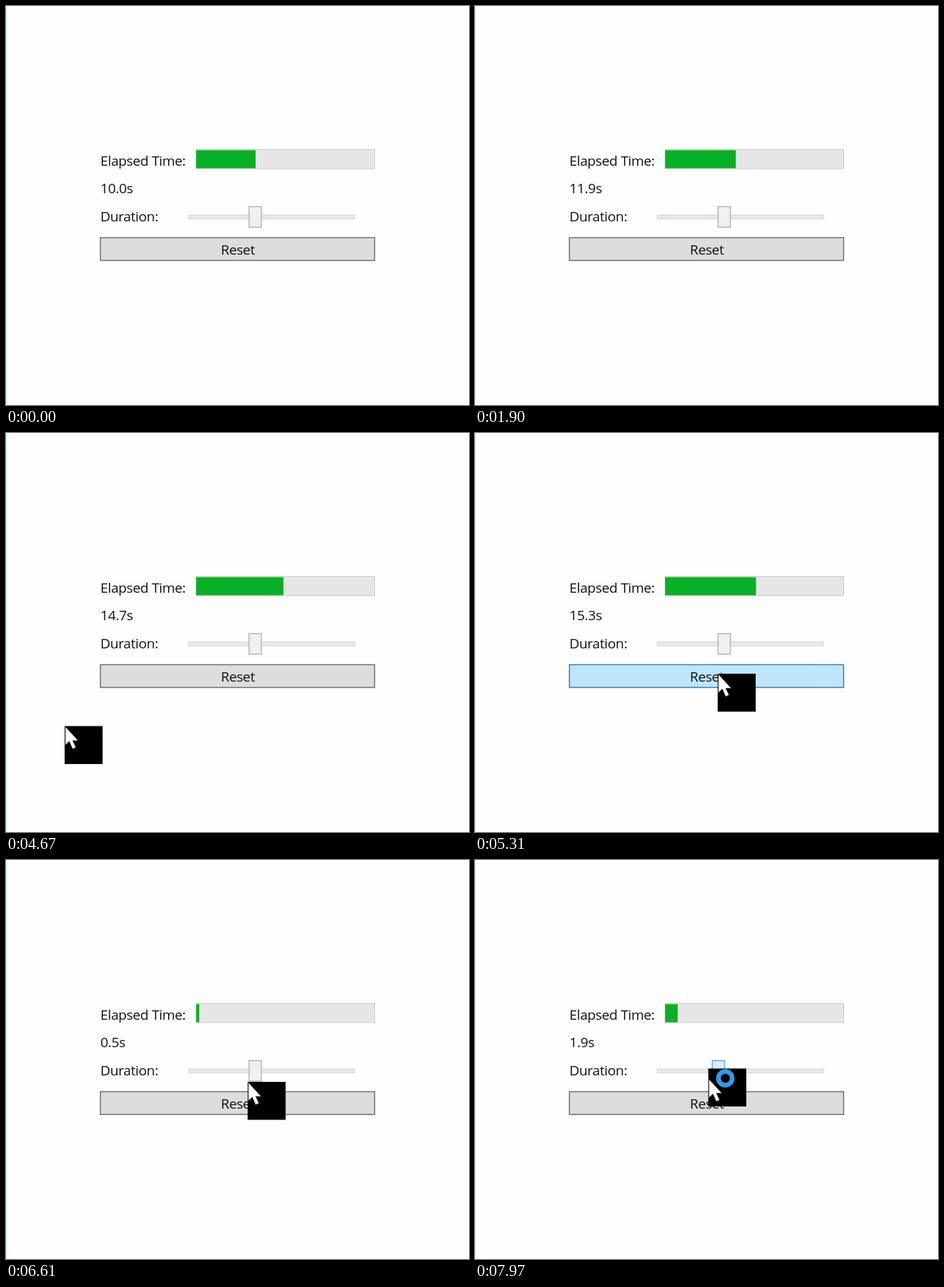
Write an HTML page that moves like this. It is 640 px wide and 552 px high and loops after 8 s.

```html
<!DOCTYPE html>
<html lang="en">
<head>
<meta charset="utf-8">
<title>Timer</title>
<style>
  html, body { margin: 0; width: 100%; height: 100%; overflow: hidden; background: #fefefe; }
  svg { display: block; width: 100%; height: 100%; }
  text { font: 19px "Open Sans", "Noto Sans", sans-serif; letter-spacing: -.37px; fill: #111; }
  #button { fill: #ddd; stroke: #707070; }
  #button.hover { fill: #bee6fd; stroke: #3c7fb1; }
  #button.pressed { fill: #c4e5f6; stroke: #2c628b; }
  #thumb { fill: #f0f0f0; stroke: #acacac; }
  #thumb.hover { fill: #dcecfc; stroke: #7eb4ea; }
  #thumb.pressed { fill: #daecfc; stroke: #569de5; }
</style>
</head>
<body>
<svg viewBox="0 0 640 552">
  <rect width="2" height="552" fill="#d9fbfd"/>

  <text x="130.5" y="221">Elapsed Time:</text>
  <rect x="262.5" y="198.5" width="247" height="26.5" fill="#e6e6e6" stroke="#c9c9c9"/>
  <rect id="bar" x="263" y="199.5" height="25" fill="#06b025"/>
  <text id="elapsed" x="130.5" y="258.5"></text>

  <text x="130.5" y="298">Duration:</text>
  <rect x="252" y="289" width="230" height="5.5" fill="#e7eaea" stroke="#d6d6d6"/>
  <rect id="thumb" y="277.5" width="17" height="28.5" stroke-width="1.3"/>

  <rect id="button" x="130.5" y="320.5" width="379" height="31.5" stroke-width="1.5"/>
  <text x="320.5" y="344" text-anchor="middle">Reset</text>

  <g id="cursor">
    <rect id="backdrop" width="52.5" height="52.5"/>
    <path d="M1 1V26L6.5 21L11 31.5L15.5 29.5L11 20H18.5Z" fill="#fff" stroke="#555" stroke-width=".6"/>
    <circle id="busy" cx="23.5" cy="-.5" r="9.5" fill="none" stroke="#3399ea" stroke-width="6.5"/>
  </g>
</svg>
<script>
  const LOOP = 8000, RESET_AT = 6090, DRAG_AT = 7800;
  const BAR_WIDTH = 246, PIXELS_PER_SECOND = 2.84;

  // Pointer tip: time, x, y
  const pointerPath = [
    [4570, 37, 405.5], [4670, 80.5, 405.5], [4870, 190, 398], [5020, 290, 370],
    [5170, 338, 354], [5310, 335.5, 333], [5700, 336, 336], [6010, 338, 339],
    [6200, 338, 339], [6400, 336, 325], [6610, 334, 307], [6870, 338, 292],
    [7200, 346, 291], [7640, 340, 292], [DRAG_AT, 340, 292], [7970, 322.5, 302.5]
  ];

  const find = id => document.getElementById(id);
  const [bar, elapsed, thumb, button, cursor, backdrop, busy] =
    ["bar", "elapsed", "thumb", "button", "cursor", "backdrop", "busy"].map(find);
  const clamp = v => Math.min(1, Math.max(0, v));
  const mix = (a, b, k) => a + (b - a) * k;

  function pointerAt(t) {
    const next = pointerPath.findIndex(p => p[0] > t);
    if (next === 0) return null;
    if (next < 0) return pointerPath.at(-1).slice(1);
    const a = pointerPath[next - 1], b = pointerPath[next];
    const k = (t - a[0]) / (b[0] - a[0]);
    return [mix(a[1], b[1], k), mix(a[2], b[2], k)];
  }

  function draw(t) {
    const ms = t < RESET_AT ? 10000 + t : t - RESET_AT;
    const seconds = Math.round(ms / 100) / 10;
    const drag = 8 * clamp((t - DRAG_AT) / 170);
    const duration = 30 - drag / PIXELS_PER_SECOND;
    elapsed.textContent = seconds.toFixed(1) + "s";
    bar.setAttribute("width", BAR_WIDTH * seconds / duration);
    thumb.setAttribute("x", 336 - drag);

    const pointer = pointerAt(t);
    const dragging = t >= DRAG_AT;
    cursor.style.display = pointer ? "" : "none";
    busy.style.display = dragging ? "" : "none";
    backdrop.setAttribute("y", dragging ? -14 : 0);
    if (pointer) cursor.setAttribute("transform", `translate(${pointer})`);

    const [x, y] = pointer || [0, 0];
    const overButton = x > 130 && x < 510 && y > 320 && y < 352;
    const overThumb = x > 336 && x < 353 && y > 277 && y < 306;
    const pressing = t >= 6010 && t < RESET_AT;
    button.setAttribute("class", !overButton ? "" : pressing ? "pressed" : "hover");
    thumb.setAttribute("class", dragging ? "pressed" : overThumb ? "hover" : "");
  }

  const start = performance.now();
  function tick() {
    draw((performance.now() - start) % LOOP);
    requestAnimationFrame(tick);
  }
  tick();
</script>
</body>
</html>
```
